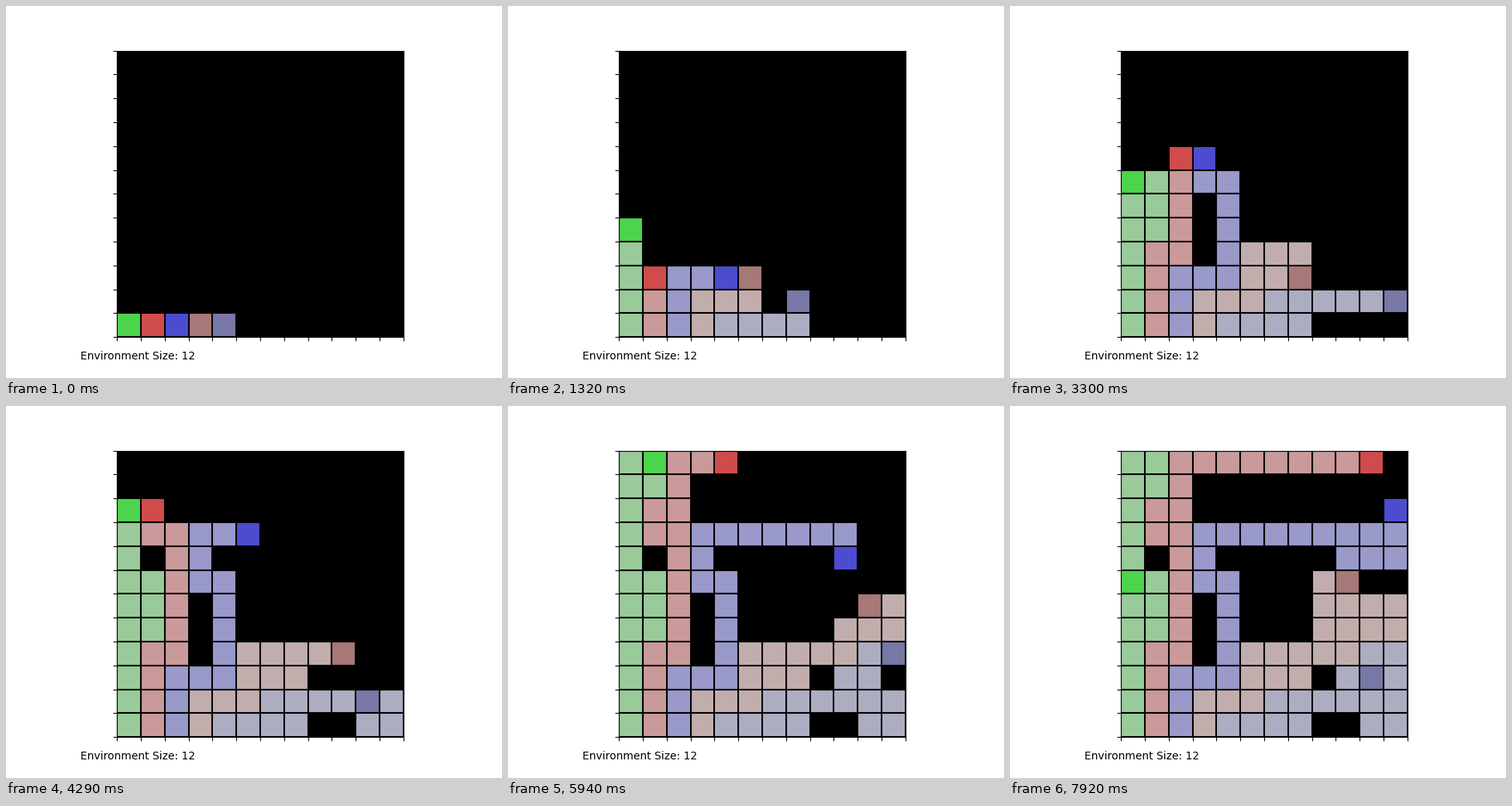
A matplotlib script for the animation above (8 s loop, 640 by 480 pixels).

```python
import numpy as np
import matplotlib.pyplot as plt
from matplotlib.animation import FuncAnimation

SIZE = 12
STEP_MS = 330
TICK_MS = 20
LOOP_MS = 8000

MOVES = {"U": (0, 1), "D": (0, -1), "L": (-1, 0), "R": (1, 0)}

# head colour, trail colour, moves; agents start side by side on the bottom row
AGENTS = [
    ("#4cd44c", "#99ca99", "UUUUURDUUL" "UUUUURDULD" "DDDD"),
    ("#d04c4c", "#ca9999", "UUDUURUUUU" "ULURUURRRR" "RRRR"),
    ("#4c4cd0", "#9999ca", "UURRUUUULU" "URRRRRRDRR" "ULRU"),
    ("#a67878", "#c2adad", "URRURULRRD" "URRURRULLL" "DUUR"),
    ("#7878a6", "#adadc2", "RRRULRRRRR" "DLUULRURDU" "LDLR"),
]


def rgb(color):
    return [int(color[i:i + 2], 16) for i in (1, 3, 5)]


def walk(start, moves):
    cells = [start]
    for m in moves:
        dx, dy = MOVES[m]
        x, y = cells[-1]
        cells.append((x + dx, y + dy))
    return cells


PATHS = [(rgb(head), rgb(trail), walk((i, 0), moves))
         for i, (head, trail, moves) in enumerate(AGENTS)]


def board(step):
    img = np.zeros((SIZE, SIZE, 3), dtype=np.uint8)
    for head, trail, cells in PATHS:
        for x, y in cells[:step]:
            img[y, x] = trail
    for head, trail, cells in PATHS:
        x, y = cells[step]
        img[y, x] = head
    return img


BOARDS = [board(k) for k in range(len(PATHS[0][2]))]

fig, ax = plt.subplots(figsize=(6.4, 4.8), dpi=100)
image = ax.imshow(BOARDS[0], origin="lower", interpolation="nearest",
                  extent=(0, SIZE, 0, SIZE))
ax.set_xticks(range(SIZE + 1))
ax.set_yticks(range(SIZE + 1))
ax.tick_params(labelbottom=False, labelleft=False)
ax.set_axisbelow(False)
ax.grid(color="black", linewidth=1.5)
fig.text(0.15, 0.05, "Environment Size: 12", fontsize=10,
         family="DejaVu Sans")


def update(n):
    # half a tick of lead rounds each step to the nearest tick
    step = (n * TICK_MS + TICK_MS // 2) // STEP_MS
    image.set_data(BOARDS[min(step, len(BOARDS) - 1)])
    return [image]


anim = FuncAnimation(fig, update, frames=LOOP_MS // TICK_MS,
                     interval=TICK_MS, repeat=True, repeat_delay=0)
plt.show()
```
